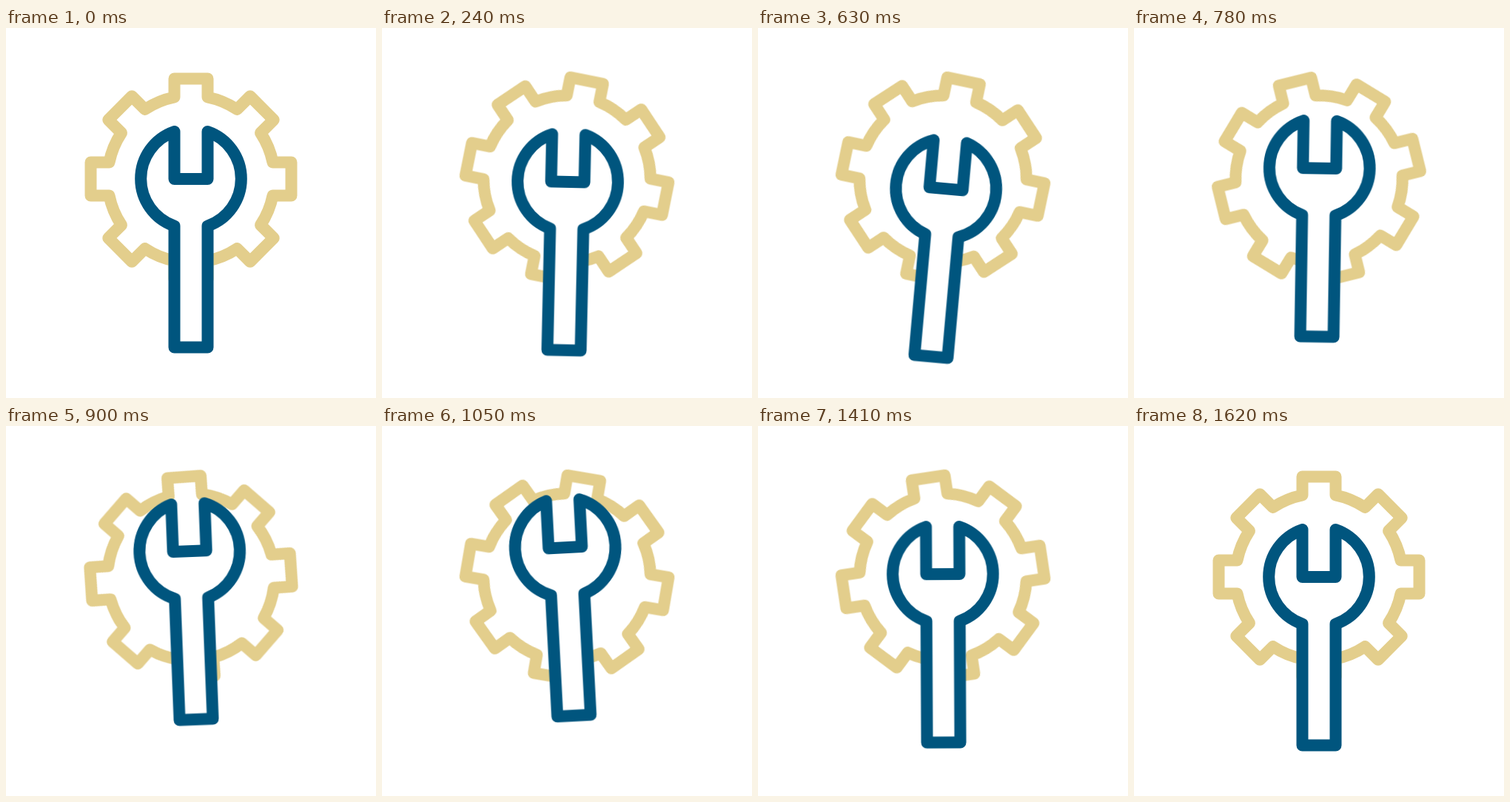
Write an HTML page that moves like this. It is 500 px wide and 500 px high and loops after 1800 ms.

```html
<!DOCTYPE html>
<html lang="en">
<head>
<meta charset="utf-8">
<title>Gear and wrench</title>
<style>
  html, body { margin: 0; width: 100%; height: 100%; overflow: hidden; background: #fff; }
  svg { display: block; width: 100vw; height: 100vh; }
  path { stroke-width: 16; stroke-linecap: round; stroke-linejoin: round; }
  #gear { fill: none; stroke: #e3ce8c; transform-origin: 250px 204px; }
  #wrench { fill: #fff; stroke: #00557e; transform-origin: 250px 250px; }
</style>
</head>
<body>
<svg viewBox="0 0 500 500">
  <path id="gear"/>
  <path id="wrench" d="M227.5 140V204H272.5V140A67.5 67.5 0 0 1 272.5 267.5V431.5H227.5V267.5A67.5 67.5 0 0 1 227.5 140Z"/>
</svg>
<script>
const TICK = 30, LOOP = 1800, MOVE = 1620;
const gear = document.getElementById('gear');
const wrench = document.getElementById('wrench');

function gearPath(teeth, half, base, tip) {
  const radius = Math.hypot(half, base);
  let d = '';
  for (let i = 0; i < teeth; i++) {
    const a = i * 2 * Math.PI / teeth, c = Math.cos(a), s = Math.sin(a);
    const at = (x, y) => `${(250 + x * c - y * s).toFixed(2)} ${(204 + x * s + y * c).toFixed(2)}`;
    d += i ? `A${radius} ${radius} 0 0 1 ` : 'M';
    d += `${at(-half, -base)}L${at(-half, -tip)}L${at(half, -tip)}L${at(half, -base)}`;
  }
  return `${d}A${radius} ${radius} 0 0 1 ${250 - half} ${204 - base}Z`;
}
gear.setAttribute('d', gearPath(8, 22.5, 110.5, 135.5));

// Each step: time in ms, drop, tilt, easing towards the next step.
const steps = [
  [0, 0, 0, '.8, 0, .48, 1'],
  [510, 18.2, 5.9, '.52, 0, .48, 1'],
  [1020, -40, -3, '.52, 0, .2, 1'],
  [MOVE, 0, 0, '0, 0, 1, 1']
];

const timing = { duration: MOVE, fill: 'both' };
const moves = [
  gear.animate(
    { transform: ['rotate(0deg)', 'rotate(360deg)'] },
    { ...timing, easing: 'cubic-bezier(.52, 0, .48, 1)' }
  ),
  wrench.animate(steps.map(([time, y, tilt, curve]) => ({
    offset: time / MOVE,
    transform: `translate(0px, ${y}px) rotate(${tilt}deg)`,
    easing: `cubic-bezier(${curve})`
  })), timing)
];
moves.forEach(m => m.pause());

const start = performance.now();
function draw() {
  const t = (performance.now() - start) % LOOP;
  const time = Math.min(Math.floor(t / TICK) * TICK, MOVE);
  moves.forEach(m => { m.currentTime = time; });
  requestAnimationFrame(draw);
}
draw();
</script>
</body>
</html>
```
